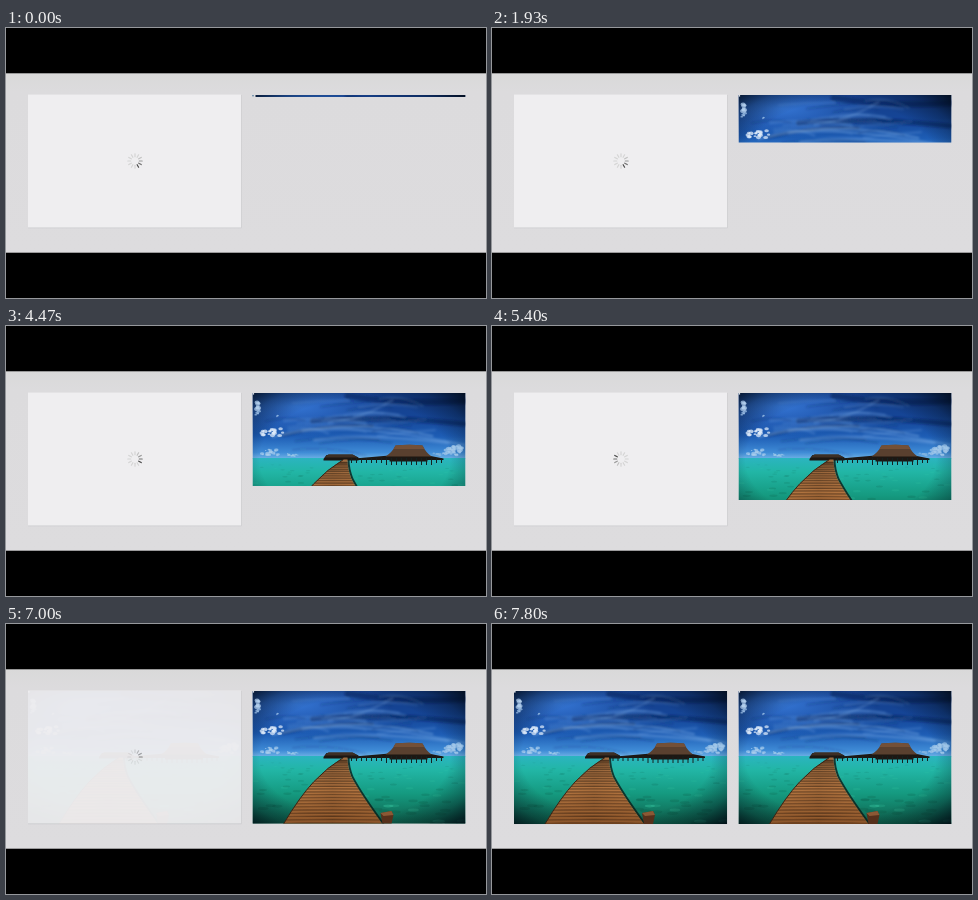
Animation of 480 by 270 pixels, one loop 7.87 s. Source, as an HTML page:

```html
<!DOCTYPE html>
<html lang="en">
<head>
<meta charset="utf-8">
<title>Image loading</title>
<style>
  html, body { margin: 0; width: 100%; height: 100%; overflow: hidden; background: #000; }
  svg { display: block; width: 100vw; height: 100vh; }
</style>
</head>
<body>
<svg viewBox="0 0 480 270" xmlns="http://www.w3.org/2000/svg">
  <defs>
    <linearGradient id="panel" x2="0" y2="1">
      <stop offset="0" stop-color="#d9d9d9"/>
      <stop offset=".1" stop-color="#dcdbdd"/>
      <stop offset="1" stop-color="#dddcde"/>
    </linearGradient>
    <linearGradient id="sky" x2="0" y2="1">
      <stop offset="0" stop-color="#153f8c"/>
      <stop offset=".35" stop-color="#154596"/>
      <stop offset=".65" stop-color="#1d5cb4"/>
      <stop offset=".9" stop-color="#3f8bd6"/>
      <stop offset="1" stop-color="#70b3e6"/>
    </linearGradient>
    <radialGradient id="glow" cx=".2" cy=".2" r=".45">
      <stop offset="0" stop-color="#3f86ea" stop-opacity=".75"/>
      <stop offset="1" stop-color="#3f86ea" stop-opacity="0"/>
    </radialGradient>
    <linearGradient id="sea" x2="0" y2="1">
      <stop offset="0" stop-color="#2bb4c0"/>
      <stop offset=".2" stop-color="#22b6a6"/>
      <stop offset=".55" stop-color="#159a80"/>
      <stop offset="1" stop-color="#0e5f4a"/>
    </linearGradient>
    <linearGradient id="wood" x2="0" y2="1">
      <stop offset="0" stop-color="#9c6b41"/>
      <stop offset=".5" stop-color="#b0733f"/>
      <stop offset="1" stop-color="#8a5429"/>
    </linearGradient>
    <radialGradient id="vignette" cx=".48" cy=".5" r=".72">
      <stop offset=".62" stop-color="#000812" stop-opacity="0"/>
      <stop offset=".82" stop-color="#000812" stop-opacity=".35"/>
      <stop offset="1" stop-color="#000812" stop-opacity=".88"/>
    </radialGradient>
    <filter id="soft" x="-20%" y="-60%" width="140%" height="220%"><feGaussianBlur stdDeviation=".8"/></filter>
    <filter id="puff" x="-20%" y="-20%" width="140%" height="140%"><feGaussianBlur stdDeviation=".6"/></filter>
    <clipPath id="frame"><rect width="213" height="133"/></clipPath>
    <clipPath id="deck"><path id="deckShape" d="M91 66.5 Q75 76 61 91 T31 133 H130 Q108 103 99 86 Q95 76 95 66.5Z"/></clipPath>
    <clipPath id="reveal"><rect id="window" x="246" y="66" width="215" height="3"/></clipPath>

    <g id="scene" clip-path="url(#frame)">
      <rect width="213" height="66" fill="url(#sky)"/>
      <rect width="213" height="66" fill="url(#glow)"/>
      <g id="streaks" fill="none" stroke-linecap="round" filter="url(#soft)">
        <g stroke="#061d50" opacity=".45">
          <path d="M60 28 Q120 22 212 31" stroke-width="5"/>
          <path d="M95 3 Q150 12 213 8" stroke-width="6"/>
          <path d="M30 42 Q80 30 120 33" stroke-width="3"/>
        </g>
        <g stroke="#8fbdf0">
          <path d="M20 44 Q90 24 180 43" stroke-width="1.6" opacity=".5"/>
          <path d="M50 38 Q110 31 212 52" stroke-width="1.6" opacity=".45"/>
          <path d="M62 47 Q115 40 196 50" stroke-width="2.4" opacity=".35"/>
          <path d="M76 30 Q112 25 140 7" stroke-width="2" opacity=".25"/>
        </g>
      </g>
      <rect y="65" width="213" height="68" fill="url(#sea)"/>
      <g id="reef"/>
      <rect width="213" height="133" fill="url(#vignette)"/>
      <g id="clouds" filter="url(#puff)"/>
      <g fill="#1c1713">
        <path d="M71 66 L74 62 H101 L106 64.5 V67.5 H71Z"/>
        <path d="M96 66 L134 62.8 H177 L191 65.5 V67 H96Z"/>
        <path d="M137 62 H175 V68.5 H137Z"/>
      </g>
      <path d="M72 64.5 L76 61.3 H100 L105 64.5Z" fill="#3d2f25"/>
      <path d="M133 63.5 Q140 59 143 52.5 Q157 51 170 52.5 Q173 59 179 63.5Z" fill="#59402f"/>
      <path d="M143 52.5 Q157 51 170 52.5 L172 56 H141Z" fill="#735038"/>
      <g id="stilts" stroke="#14211f"/>
      <path d="M131 133 Q109 103 100 86 Q96 76 96 67" fill="none" stroke="#0b1c18" stroke-width="2" opacity=".8"/>
      <use href="#deckShape" fill="url(#wood)"/>
      <g id="planks" clip-path="url(#deck)" stroke="#4b2b16"/>
      <path d="M91 66.5 Q75 76 61 91 T31 133" fill="none" stroke="#3a2314" stroke-width="1"/>
      <path d="M128 122 L139 120 L141 124 L139 133 H130Z" fill="#56301b"/>
      <path d="M128 122 L139 120 L141 124 L131 125Z" fill="#8b5935"/>
      <rect width="1.6" height="1.6" fill="#d5dbe2"/>
    </g>
  </defs>

  <rect width="480" height="270"/>
  <rect y="45.3" width="480" height="179.4" fill="url(#panel)"/>
  <rect x="22" y="67" width="213.4" height="133.2" fill="#c4c3c5"/>
  <rect x="22" y="66.6" width="213" height="133" fill="#efeef0"/>
  <g id="spinner" transform="translate(129 133)" stroke-width="1.2" stroke-linecap="round"/>
  <use id="finished" href="#scene" x="22" y="67"/>
  <g clip-path="url(#reveal)"><use href="#scene" x="246.5" y="67"/></g>
  <g id="start">
    <rect x="246" y="66.5" width="3.5" height="3" fill="#dcdbdd"/>
    <rect x="246.3" y="67" width="1.4" height="1.4" fill="#527d9f"/>
  </g>
</svg>
<script>
const LOOP = 7870;
const STEP = 200 / 3;
const SPIN = 642;
const SPOKES = 12;
const byId = id => document.getElementById(id);
const clamp = v => Math.min(1, Math.max(0, v));

function add(parent, tag, attrs) {
  const node = document.createElementNS('http://www.w3.org/2000/svg', tag);
  for (const key in attrs) node.setAttribute(key, attrs[key]);
  return byId(parent).appendChild(node);
}

let seed = 11;
const random = () => (seed = (seed * 16807) % 2147483647) / 2147483647;
const spread = size => (random() + random() - 1) * size;

function cloud(x, y, w, h, count, fill) {
  for (let i = 0; i < count; i++) {
    const r = 0.5 + random() * h * 0.28;
    add('clouds', 'ellipse', { cx: x + spread(w), cy: y + spread(h), rx: r * 1.5, ry: r, fill, opacity: 0.7 });
  }
}
cloud(19, 38.5, 12, 5, 24, '#e4f0fc');
cloud(6, 12, 3, 6, 9, '#b5d2f0');
cloud(4, 20, 3, 3, 5, '#a3c5e9');
cloud(24, 23, 2, 2, 4, '#8fb5df');
cloud(18, 59.5, 10, 4, 20, '#a9cdec');
cloud(41, 62, 7, 1.6, 12, '#a0caea');
cloud(201, 57, 11, 6, 28, '#a4c9ea');
cloud(186, 61, 8, 2, 10, '#83b5e1');

// Thin wisps that fan out across the sky
for (let i = 0; i < 26; i++) {
  const x = 10 + random() * 120, y = 4 + random() * 54, length = 35 + random() * 55;
  add('streaks', 'path', {
    d: `M${x} ${y}q${length / 2} ${-5 + spread(4)} ${length} ${spread(8)}`,
    stroke: i % 3 ? '#82b1ee' : '#0a2a66', 'stroke-width': 0.8 + random() * 1.6, opacity: 0.22
  });
}

for (let i = 0; i < 110; i++) {
  const depth = random();
  add('reef', 'ellipse', {
    cx: random() * 213, cy: 68 + depth * 65, rx: 1.5 + depth * 5, ry: 0.4 + depth * 1.4,
    fill: i % 3 ? '#0a4a38' : '#3fd0a8', opacity: 0.08 + depth * 0.16
  });
}

for (let x = 99; x < 191; x += 5) {
  add('stilts', 'path', { d: `M${x} 65V${x > 132 && x < 180 ? 72 : 70}`, 'stroke-width': 1 });
}

for (let i = 0; i < 26; i++) {
  const s = i / 26, y = 69 + 66 * s ** 1.35;
  add('planks', 'path', { d: `M20 ${y + 1}Q80 ${y - 1.5} 140 ${y + 1}`, 'stroke-width': 0.4 + s * 0.6, opacity: 0.42 });
}

const spokes = Array.from({ length: SPOKES }, (_, i) =>
  add('spinner', 'path', { d: 'M0 -4.3V-7.2', transform: `rotate(${i * 360 / SPOKES})` }));

// Time and lower edge of the loaded part
const edges = [[0, 69], [1930, 114.5], [3200, 135], [4000, 152], [4470, 160],
  [4800, 164.5], [5600, 177], [6330, 187.5], [7050, 200.5]];

function edgeAt(t) {
  const i = edges.findIndex(([time]) => time > t);
  if (i < 0) return 200.5;
  const [t0, y0] = edges[i - 1], [t1, y1] = edges[i];
  return y0 + (y1 - y0) * (t - t0) / (t1 - t0);
}

function draw(time) {
  const t = Math.floor((time % LOOP + 4) / STEP) * STEP;
  byId('window').setAttribute('height', edgeAt(t) - 66);
  byId('start').setAttribute('visibility', t < STEP ? 'visible' : 'hidden');

  const fade = clamp((t - 6900) / 880);
  byId('finished').setAttribute('opacity', 0.5 - Math.cos(fade * Math.PI) / 2);
  byId('spinner').setAttribute('opacity', 1 - clamp((t - 6930) / 200));

  const lead = Math.round(4.6 + t / SPIN * SPOKES);
  spokes.forEach((spoke, i) => {
    const age = (lead - i + SPOKES * 100) % SPOKES;
    const grey = Math.round(212 - 140 * Math.max(0, 1 - age / 3.5));
    spoke.setAttribute('stroke', `rgb(${grey},${grey},${grey})`);
  });
}

const begin = performance.now();
function tick() {
  draw(performance.now() - begin);
  requestAnimationFrame(tick);
}
draw(0);
requestAnimationFrame(tick);
</script>
</body>
</html>
```
